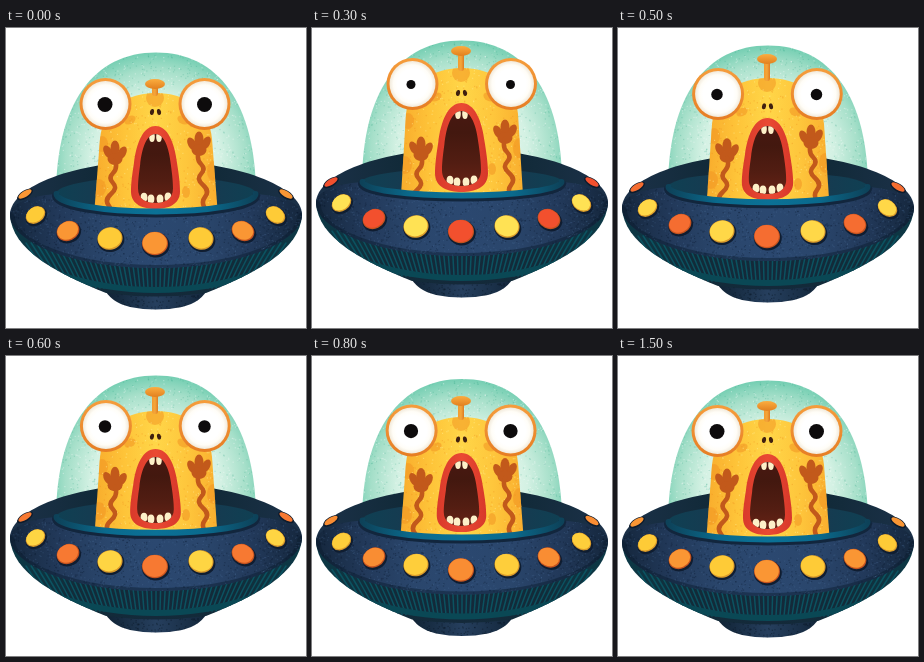
Write an HTML page with a canvas that moves like this. It is 300 by 300 pixels and loops after 1.6 s.

```html
<!DOCTYPE html>
<html lang="en">
<head>
<meta charset="utf-8">
<title>Startled alien in a saucer</title>
<style>
html, body { margin: 0; width: 100%; height: 100%; overflow: hidden; background: #fff; }
canvas { display: block; width: 300px; height: 300px; }
</style>
</head>
<body>
<canvas id="stage"></canvas>
<script>
const canvas = document.getElementById('stage');
const g = canvas.getContext('2d');
const ratio = window.devicePixelRatio || 1;
canvas.width = canvas.height = 300 * ratio;

// start ms, ship lift, eye y, head top, knob y, mouth top, mouth bottom
const steps = [
  [0, 0, 76, 65, 56, 98, 181],
  [100, 3, 72, 58, 44, 95, 177],
  [200, 7, 66, 50, 31, 90, 172],
  [300, 12, 56, 40, 23, 75, 164],
  [400, 10, 61, 44, 26, 82, 168],
  [500, 7, 66, 50, 31, 90, 172],
  [600, 5, 70, 55, 36, 93, 173],
  [700, 3, 73, 59, 41, 95, 174],
  [800, 1.5, 74.5, 61, 45, 97, 176],
  [900, .5, 75, 62, 48, 98, 178],
  [1000, 0, 75, 63, 49, 98, 178],
  [1500, 0, 75, 63, 50, 98, 179]
];
const LOOP = 1600;

function seeded(seed) {
  return () => (seed = (seed * 16807) % 2147483647) / 2147483647;
}

function addStops(fill, colors) {
  colors.forEach((c, i) => fill.addColorStop(i / (colors.length - 1), c));
  return fill;
}

const across = (x0, x1, ...colors) => addStops(g.createLinearGradient(x0, 0, x1, 0), colors);
const down = (y0, y1, ...colors) => addStops(g.createLinearGradient(0, y0, 0, y1), colors);
const glow = (x, y, r0, r1, ...colors) =>
  addStops(g.createRadialGradient(x, y, r0, x, y, r1), colors);

function mix(a, b, p) {
  return `rgb(${a.map((v, i) => Math.round(v + (b[i] - v) * p))})`;
}

function oval(x, y, rx, ry, fill, turn = 0) {
  g.beginPath();
  g.ellipse(x, y, rx, ry, turn, 0, Math.PI * 2);
  g.fillStyle = fill;
  g.fill();
}

function shape(d, fill) {
  const path = new Path2D(d);
  g.fillStyle = fill;
  g.fill(path);
  return path;
}

function line(d, color, width) {
  g.strokeStyle = color;
  g.lineWidth = width;
  g.lineCap = g.lineJoin = 'round';
  g.stroke(new Path2D(d));
}

function within(path, draw) {
  g.save();
  g.clip(path);
  draw();
  g.restore();
}

function grain(seed, count, x, y, w, h, color) {
  const rnd = seeded(seed);
  g.fillStyle = color;
  for (let i = 0; i < count; i++) g.fillRect(x + rnd() * w, y + rnd() * h, 1.2, 1.2);
}

function drawDome() {
  const dome = shape('M50 168C50 75 88 24.5 150 24.5S250 75 250 168Z',
    glow(150, 132, 40, 116, '#e6f7ed', '#d3f1e3', '#a5dfc9', '#5cc6a7'));
  within(dome, () => {
    grain(11, 700, 50, 24, 200, 130, 'rgba(255,255,255,.35)');
    grain(29, 600, 50, 24, 200, 130, 'rgba(40,160,130,.22)');
  });
}

function drawDeck(ry) {
  shape('M4 187C4 158 70 133 150 133S296 158 296 187Z',
    across(4, 296, '#1c3149', '#132b3b', '#0c2530', '#132b3b', '#1c3149'));
  oval(150, 166, 100, ry, across(50, 250, '#0f4053', '#173a50', '#122f42', '#173a50', '#0f4053'));
}

function drawBase() {
  const foot = shape('M98 260Q104 274 124 279Q150 284 176 279Q196 274 202 260Z',
    across(98, 202, '#0f2233', '#263f5e', '#12263a'));
  within(foot, () => grain(41, 160, 98, 262, 104, 20, 'rgba(8,20,34,.4)'));
  const bowl = shape('M4 187C6 222 50 245 100 265Q150 272 200 265C250 245 294 222 296 187Z',
    across(4, 296, '#0c3946', '#122b39', '#14293a', '#122b39', '#0c3946'));
  within(bowl, () => {
    for (let i = -26; i <= 26; i++) {
      const x = 150 + i * 5.2;
      line(`M${x} 215L${150 + i * 4} 260`, '#0b5260', 1.5);
    }
    line('M55 247Q100 262 150 262T245 247', '#0a4855', 6);
  });
}

function drawDisc(ry) {
  const disc = shape(
    `M4 187C4 176 22 168 50 166A100 ${ry} 0 0 0 250 166C278 168 296 176 296 187` +
    'C296 212 238 240 150 240S4 212 4 187Z',
    across(4, 296, '#15273d', '#22395a', '#2a466c', '#2b4870', '#2a466c', '#22395a', '#15273d'));
  within(disc, () => {
    line('M4 190C4 214 62 242 150 242S296 214 296 190', 'rgba(11,28,46,.45)', 10);
    grain(97, 900, 4, 166, 292, 76, 'rgba(80,118,160,.25)');
    grain(131, 900, 4, 166, 292, 76, 'rgba(8,22,42,.3)');
  });
  line(`M50 168A100 ${ry} 0 0 0 250 168`, '#12263d', 8);
  line(`M50.5 166A99.5 ${ry} 0 0 0 249.5 166`,
    across(50, 250, '#0d4259', '#0a6a8d', '#0b7196', '#0a6a8d', '#0d4259'), 6);
}

function drawLights(p) {
  const yellow = mix([254, 203, 55], [255, 226, 84], p);
  const orange = mix([250, 150, 52], [242, 80, 46], p);
  [-1, 1].forEach(side => {
    oval(149.5 + side * 130.5, 166.5, 9, 4, '#0d1b2d', side * .55);
    oval(149.5 + side * 130.5, 166, 7.5, 3, orange, side * .55);
  });
  const spots = [[29.5, 187], [62, 203], [104, 210.5], [149, 215.5], [195, 210.5], [237, 203], [269.5, 187]];
  spots.forEach(([x, y], i) => {
    const side = (x - 149.5) / 120;
    const rx = 13 - 2.5 * side * side;
    const ry = 11.7 - 3.7 * side * side;
    const turn = side * .6;
    oval(x + .8, y + 1.5, rx + 1, ry + .8, '#0f1d31', turn);
    oval(x, y, rx, ry, i % 2 ? '#c4521f' : '#d99a2b', turn);
    oval(x - .3, y - .5, rx - .8, ry - .8, i % 2 ? orange : yellow, turn);
  });
}

function drawMarking(x, y, side) {
  g.save();
  g.translate(x, y);
  g.scale(side, 1);
  const ink = '#c2591b';
  oval(0, -6, 4.5, 7.5, ink);
  oval(-7, -1, 4, 7, ink, -.5);
  oval(7, -2, 4, 7, ink, .5);
  oval(0, 5, 7.5, 6, ink);
  line('M0 6Q-3 14 2 19T2 29T4 40T6 52T8 66', ink, 4.5);
  g.restore();
}

function drawHead(top, mouthTop, p) {
  const neck = top + 46;
  const head = shape(
    `M87 200L94 ${neck}C97 ${top + 14} 122 ${top} 150 ${top}S203 ${top + 14} 206 ${neck}L213 200Z`,
    across(87, 213, '#f8ab2c', '#fec439', '#ffd648', '#fec63c', '#f9ad2e'));
  within(head, () => {
    const spot = 'rgba(243,150,36,.55)';
    oval(149, top + 5, 9, 9, spot);
    oval(124, mouthTop - 6, 6, 4, spot, -.5);
    oval(177, mouthTop - 6, 6, 4, spot, .5);
    oval(96, mouthTop + 18, 6, 8, spot);
    oval(207, mouthTop + 45, 6, 10, spot);
    oval(93, mouthTop + 62, 7, 9, spot);
    oval(180, mouthTop + 66, 4, 6, spot);
    grain(53, 300, 86, top, 128, 150, 'rgba(238,140,30,.35)');
    grain(71, 260, 86, top, 128, 150, 'rgba(255,240,150,.45)');
  });
  drawMarking(109, 126 - p * 4, -1);
  drawMarking(193, 117 - p * 12, 1);
  const nose = mouthTop - 14 + p * 4;
  oval(146, nose, 2, 3, '#40200f', .2);
  oval(153, nose, 2, 3, '#40200f', -.2);
}

function drawAntenna(top, knob) {
  line(`M149 ${knob}V${top}`, across(146, 152, '#f19a31', '#f4a63a', '#dd7a22'), 6);
  oval(149, knob, 10, 5, down(knob - 5, knob + 5, '#fbad3f', '#e2801f'));
}

function drawEye(x, y, pupilX, pupilR) {
  oval(x, y, 26, 26, down(y - 26, y + 26, '#f59d3c', '#e67d24'));
  oval(x, y, 23, 23, glow(x, y, 15, 23, '#fff', '#fffdf7', '#f1e9da'));
  oval(pupilX, y + .5, pupilR, pupilR, '#0d0b0c');
}

function mouthPath(top, bottom, half) {
  const h = bottom - top;
  const y = k => top + h * k;
  const x = k => 149.5 + half * k;
  return `M${x(0)} ${top}C${x(-.5)} ${top} ${x(-.78)} ${y(.2)} ${x(-.88)} ${y(.45)}` +
    `C${x(-.96)} ${y(.6)} ${x(-1)} ${y(.7)} ${x(-1)} ${y(.79)}` +
    `C${x(-1)} ${y(.95)} ${x(-.5)} ${bottom} ${x(0)} ${bottom}` +
    `S${x(1)} ${y(.95)} ${x(1)} ${y(.79)}` +
    `C${x(1)} ${y(.7)} ${x(.96)} ${y(.6)} ${x(.88)} ${y(.45)}` +
    `C${x(.78)} ${y(.2)} ${x(.5)} ${top} ${x(0)} ${top}Z`;
}

function drawMouth(top, bottom, p) {
  const half = 24.5 + p * 2;
  shape(mouthPath(top, bottom, half), across(125, 175, '#d93a2b', '#ea4a33', '#d7372a'));
  const hole = shape(mouthPath(top + 8, bottom - 6, half - 7),
    down(top, bottom, '#4a1812', '#43180f', '#521d12', '#6b2416'));
  within(hole, () => {
    const tooth = '#fdf0c8';
    [146, 153].forEach(x => oval(x, top + 11, 2.8, 5, tooth));
    [138, 145, 154, 162].forEach(x => {
      const bend = Math.abs(x - 149.5) * .25;
      oval(x, bottom - 9 - bend, 3.4, 4.5, tooth);
    });
  });
}

function draw([, lift, eyeY, top, knob, mouthTop, mouthBottom]) {
  const p = lift / 12;
  const ry = 17.5 - p * 4;
  g.setTransform(ratio, 0, 0, ratio, 0, 0);
  g.fillStyle = '#fff';
  g.fillRect(0, 0, 300, 300);

  const onShip = part => {
    g.save();
    g.translate(0, -lift);
    part();
    g.restore();
  };

  onShip(() => {
    drawDome();
    drawBase();
    drawDeck(ry);
  });

  // The body stays behind the cockpit's front rim.
  const opening = new Path2D(`M50 0H250V${166 - lift}A100 ${ry} 0 0 1 50 ${166 - lift}Z`);
  within(opening, () => {
    drawHead(top, mouthTop, p);
    drawAntenna(top, knob);
    drawMouth(mouthTop, mouthBottom, p);
  });
  drawEye(99.5 + p, eyeY, 99, 7.5 - p * 3);
  drawEye(198.5 + p * .5, eyeY, 198.5, 7.5 - p * 3);
  onShip(() => {
    drawDisc(ry);
    drawLights(p);
  });
}

let shown;
function tick() {
  const t = performance.now() % LOOP;
  const step = steps.filter(s => s[0] <= t).pop();
  if (step !== shown) draw(shown = step);
  requestAnimationFrame(tick);
}
tick();
</script>
</body>
</html>
```
